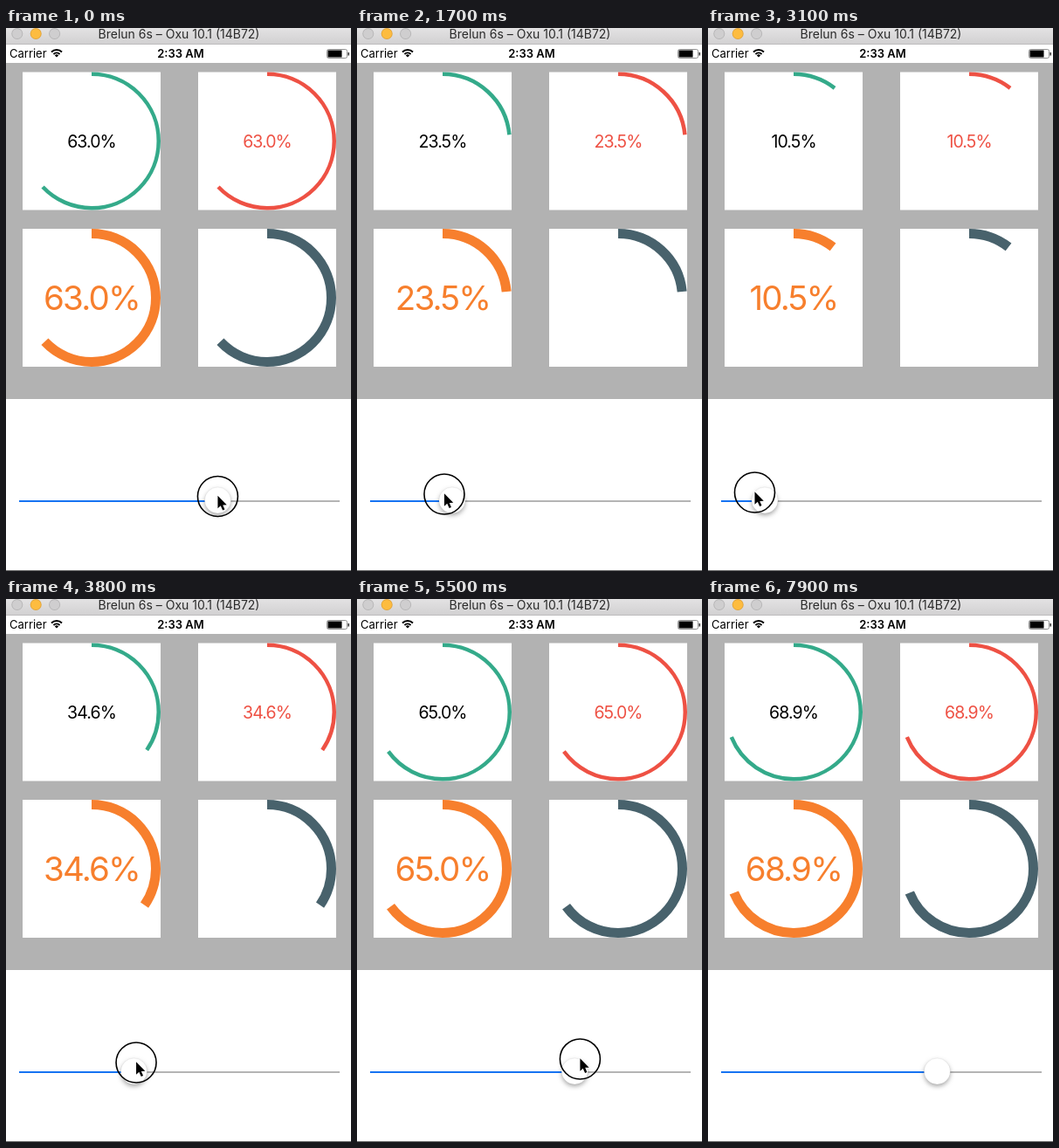
These frames come from a looping animation (395 px wide and 622 px high, 8 s). An HTML page with a canvas:

```html
<!DOCTYPE html>
<html lang="en">
<head>
<meta charset="utf-8">
<title>Circular progress</title>
<style>
html, body { margin: 0; width: 100%; height: 100%; overflow: hidden; background: #fff; }
canvas { display: block; width: 395px; height: 622px; }
</style>
</head>
<body>
<canvas id="stage"></canvas>
<script>
const W = 395, H = 622, LOOP = 8000, STEP = 100, RELEASE = 6800;
const FONT = 'Inter, Roboto, sans-serif';
const UP = -Math.PI / 2, TURN = Math.PI * 2;
const COLORS = ['#34aa8a', '#ee5144', '#f77f2d', '#48626c'];

const canvas = document.getElementById('stage');
const ctx = canvas.getContext('2d');
const ratio = window.devicePixelRatio || 1;
canvas.width = W * ratio;
canvas.height = H * ratio;
ctx.scale(ratio, ratio);

// Turning points of the drag: how far the pointer leads the thumb, and its height
const drag = [
  { t: 0, percent: 63, lead: 0, y: 536.5 },
  { t: 1700, percent: 23.5, lead: -9, y: 534 },
  { t: 3100, percent: 10.5, lead: -11.5, y: 532 },
  { t: 3800, percent: 34.6, lead: 2.6, y: 531 },
  { t: 4900, percent: 58.2, lead: 5, y: 526.5 },
  { t: 6200, percent: 68.9, lead: 7, y: 527.5 }
];

// Slope of the line between two neighbouring points; flat outside the drag
function secant(key, i) {
  const a = drag[i], b = drag[i + 1];
  return a && b ? (b[key] - a[key]) / (b.t - a.t) : 0;
}

function tangent(key, i) {
  if (i === 0) return secant(key, 0);
  const a = secant(key, i - 1), b = secant(key, i);
  return a * b > 0 ? 2 * a * b / (a + b) : 0;
}

// Smooth curve through the points that never overshoots them
function valueAt(key, t) {
  const i = drag.findLastIndex(p => p.t <= t);
  const a = drag[i], b = drag[i + 1];
  if (!b) return a[key];
  const span = b.t - a.t, u = (t - a.t) / span, v = 1 - u;
  return a[key] * v * v * (1 + 2 * u) + b[key] * u * u * (1 + 2 * v)
    + span * u * v * (v * tangent(key, i) - u * tangent(key, i + 1));
}

function box(x, y, w, h, fill) {
  ctx.fillStyle = fill;
  ctx.fillRect(x, y, w, h);
}

function disc(x, y, r, fill) {
  ctx.beginPath();
  ctx.arc(x, y, r, 0, TURN);
  ctx.fillStyle = fill;
  ctx.fill();
}

function arc(x, y, r, from, sweep, color, width) {
  ctx.beginPath();
  ctx.arc(x, y, r, from, from + sweep);
  ctx.strokeStyle = color;
  ctx.lineWidth = width;
  ctx.stroke();
}

function label(str, x, y, size, color, align = 'center', weight = 400, spacing = 0) {
  ctx.font = `${weight} ${size}px ${FONT}`;
  ctx.letterSpacing = spacing + 'px';
  ctx.textAlign = align;
  ctx.fillStyle = color;
  ctx.fillText(str, x, y);
}

function titleBar() {
  const shade = ctx.createLinearGradient(0, 0, 0, 19);
  shade.addColorStop(0, '#e3e2e3');
  shade.addColorStop(1, '#d1d0d1');
  box(0, 0, W, 19, shade);
  box(0, 18, W, 1, '#bdbcbd');
  for (let i = 0; i < 3; i++) {
    const x = 12.8 + i * 21.4, lit = i === 1;
    disc(x, 6.5, 6.5, lit ? '#e0a33a' : '#b5b4b5');
    disc(x, 6.5, 5.6, lit ? '#fdbc40' : '#cfcecf');
  }
  label('Brelun 6s – Oxu 10.1 (14B72)', 198, 12, 14, '#2a2a2a');
}

function statusBar() {
  label('Carrier', 4, 34, 13, '#000', 'left');
  label('2:33 AM', 200, 34, 13, '#000', 'center', 600);
  for (const r of [1.5, 5, 8.5]) {
    arc(58, 33.5, r, UP - TURN / 8, TURN / 4, '#000', r < 2 ? 3 : 1.9);
  }
  ctx.beginPath();
  ctx.roundRect(367.5, 24.5, 23, 10, 2);
  ctx.strokeStyle = '#777';
  ctx.lineWidth = 0.8;
  ctx.stroke();
  box(368.5, 25.5, 16, 8, '#000');
  box(391.5, 28, 1.5, 3.5, '#333');
}

function gauge(color, i, percent) {
  const col = i % 2, big = i > 1;
  const x = 19 + col * 201, y = big ? 230 : 50.5;
  const line = big ? 11 : 4.5, size = big ? 38.5 : 19.5;
  const cx = x + 79, cy = y + 79;
  box(x, y, 158, 158, '#fff');
  arc(cx, cy, 79 - line / 2, UP, TURN * percent / 100, color, line);
  if (big && col) return;
  const ink = i ? color : '#000';
  label(percent.toFixed(1) + '%', cx, cy + size * 0.37, size, ink, 'center', 400, -size * 0.047);
}

function slider(x) {
  box(15, 541, 367, 2, '#b4b4b4');
  box(15, 541, x - 15, 2, '#1673f2');
  ctx.save();
  ctx.shadowColor = 'rgba(0,0,0,.32)';
  ctx.shadowBlur = 5 * ratio;
  ctx.shadowOffsetY = 2.5 * ratio;
  disc(x, 541, 15, '#fff');
  ctx.restore();
  arc(x, 541, 15, 0, TURN, 'rgba(0,0,0,.1)', 0.6);
}

const arrow = new Path2D('M0 0V14.5L3.3 11.5L5.7 16.8L8 15.8L5.8 10.7L10.3 10.5Z');

function pointer(x, y) {
  arc(x, y, 23, 0, TURN, '#000', 1.6);
  ctx.save();
  ctx.translate(x, y - 0.8);
  ctx.strokeStyle = '#fff';
  ctx.lineWidth = 1.6;
  ctx.stroke(arrow);
  ctx.fillStyle = '#000';
  ctx.fill(arrow);
  ctx.restore();
}

function draw(t) {
  const percent = valueAt('percent', t);
  const thumb = 29.5 + 3.38 * percent;
  box(0, 0, W, H, '#fff');
  titleBar();
  statusBar();
  box(0, 40, W, 385, '#b2b2b2');
  COLORS.forEach((color, i) => gauge(color, i, percent));
  slider(thumb);
  if (t < RELEASE) pointer(thumb + valueAt('lead', t), valueAt('y', t));
  box(0, 621, W, 1, '#6b6b6b');
}

const begin = performance.now();
function tick() {
  const t = (performance.now() - begin) % LOOP;
  draw(Math.floor(t / STEP) * STEP);
  requestAnimationFrame(tick);
}
tick();
</script>
</body>
</html>
```
